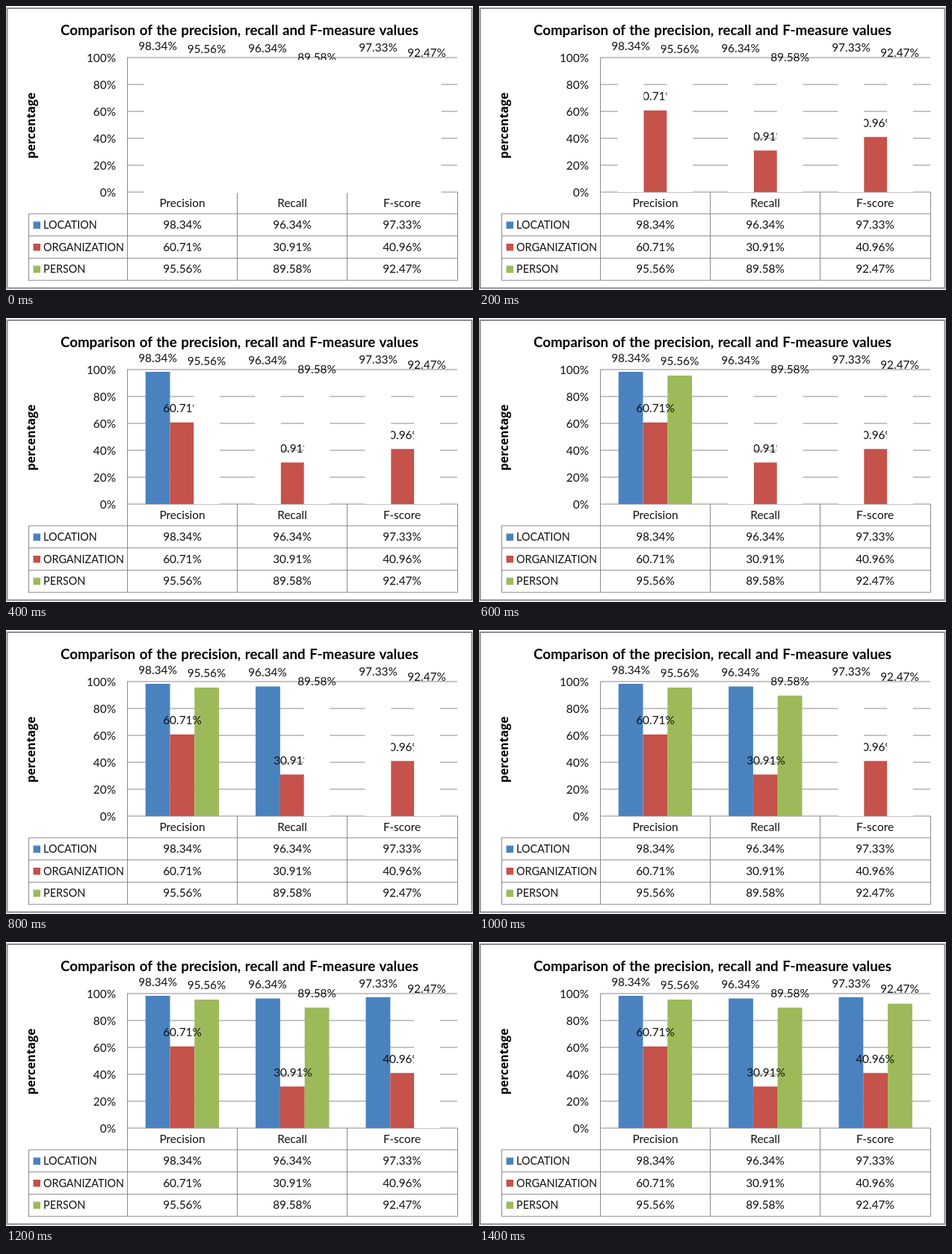
An HTML page that plays this animation: 625 px wide and 380 px high, repeating every 1.6 s.

```html
<!DOCTYPE html>
<html lang="en">
<head>
<meta charset="utf-8">
<title>Precision, recall and F-measure</title>
<style>
html, body { margin: 0; width: 100%; height: 100%; overflow: hidden; background: #fff; }
svg { display: block; }
text { font: 15.4px Lato, "Open Sans", sans-serif; fill: #111; text-anchor: middle; }
.title { font-size: 18.75px; font-weight: bold; word-spacing: 1px; fill: #000; }
.side { font: bold 15.8px "Open Sans", sans-serif; fill: #000; }
.tick { text-anchor: end; }
.name { font-size: 14.4px; text-anchor: start; }
.line { stroke: #8a8a8a; fill: none; }
</style>
</head>
<body>
<svg id="chart" width="625" height="380" viewBox="0 0 625 380"></svg>
<script>
const svg = document.getElementById('chart');
const STEP = 200, STEPS = 8, BASE = 249, FULL = 180;
const BAR = 32.8, ROW = 29.7;

const series = [
  { name: 'LOCATION', color: '#4a82c0', values: [98.34, 96.34, 97.33] },
  { name: 'ORGANIZATION', color: '#c5524b', values: [60.71, 30.91, 40.96] },
  { name: 'PERSON', color: '#9cba5a', values: [95.56, 89.58, 92.47] },
];
const groups = ['Precision', 'Recall', 'F-score'];
// Value label positions [x, baseline], by series and group
const labelAt = [
  [[203, 58.5], [350, 62], [498, 60.5]],
  [[236, 125.5], [384, 179.5], [530, 161.5]],
  [[268.5, 63], [416, 73.5], [563, 68]],
];

function add(tag, attrs, content) {
  const el = document.createElementNS('http://www.w3.org/2000/svg', tag);
  for (const key in attrs) el.setAttribute(key, attrs[key]);
  if (content) el.textContent = content;
  return svg.appendChild(el);
}
const text = (x, y, content, cls = '') => add('text', { x, y, class: cls }, content);
const rect = (x, y, width, height, fill) => add('rect', { x, y, width, height, fill });
const line = d => add('path', { d, class: 'line' });
const percent = v => v.toFixed(2) + '%';
const barX = (group, k) => 186.7 + group * 147.4 + k * BAR;

add('rect', { x: 1.5, y: 3, width: 622, height: 374.5, class: 'line', 'stroke-width': 2 });
text(312.5, 39, 'Comparison of the precision, recall and F-measure values', 'title');
add('text', { transform: 'translate(39 160) rotate(-90)', class: 'side' }, 'percentage');

// Grid and axis
for (let i = 0; i <= 5; i++) {
  const y = BASE - i * FULL / 5;
  line(`M162 ${y}H604`);
  text(147, y + 5.5, i * 20 + '%', 'tick');
}
line('M162.5 69V367');

// Table
for (let i = 0; i < 4; i++) line(`M30 ${278 + i * ROW}H605`);
line('M30.5 278V367M309.5 249V367M456.5 249V367M604.5 249V367');
groups.forEach((g, i) => text(236 + i * 147, 269, g));
series.forEach((s, row) => {
  const y = 298.3 + row * 29.5;
  rect(36.5, y - 9.8, 9.5, 9.5, s.color);
  text(50, y, s.name, 'name');
  s.values.forEach((v, i) => text(236 + i * 147, y, percent(v)));
});

// Bars, then their value labels
series.forEach((s, k) => s.values.forEach((v, i) => {
  const h = v / 100 * FULL;
  rect(barX(i, k), BASE - h, BAR, h, s.color);
}));
series.forEach((s, k) => s.values.forEach((v, i) => text(...labelAt[k][i], percent(v))));

// White covers, each a little wider than its bar, are lifted one after another
const cover = (group, k, top) => rect(barX(group, k) - 1, top, BAR + 2, BASE - top, '#fff');
const covers = [rect(184.5, 72, 398, 178, '#fff')];
groups.forEach((g, i) => covers.push(cover(i, 0, 71.5), cover(i, 2, 76.5)));

function frame(now) {
  const step = Math.floor(now / STEP) % STEPS;
  covers.forEach((c, i) => c.setAttribute('visibility', step <= i ? 'visible' : 'hidden'));
  requestAnimationFrame(frame);
}
frame(0);
</script>
</body>
</html>
```
